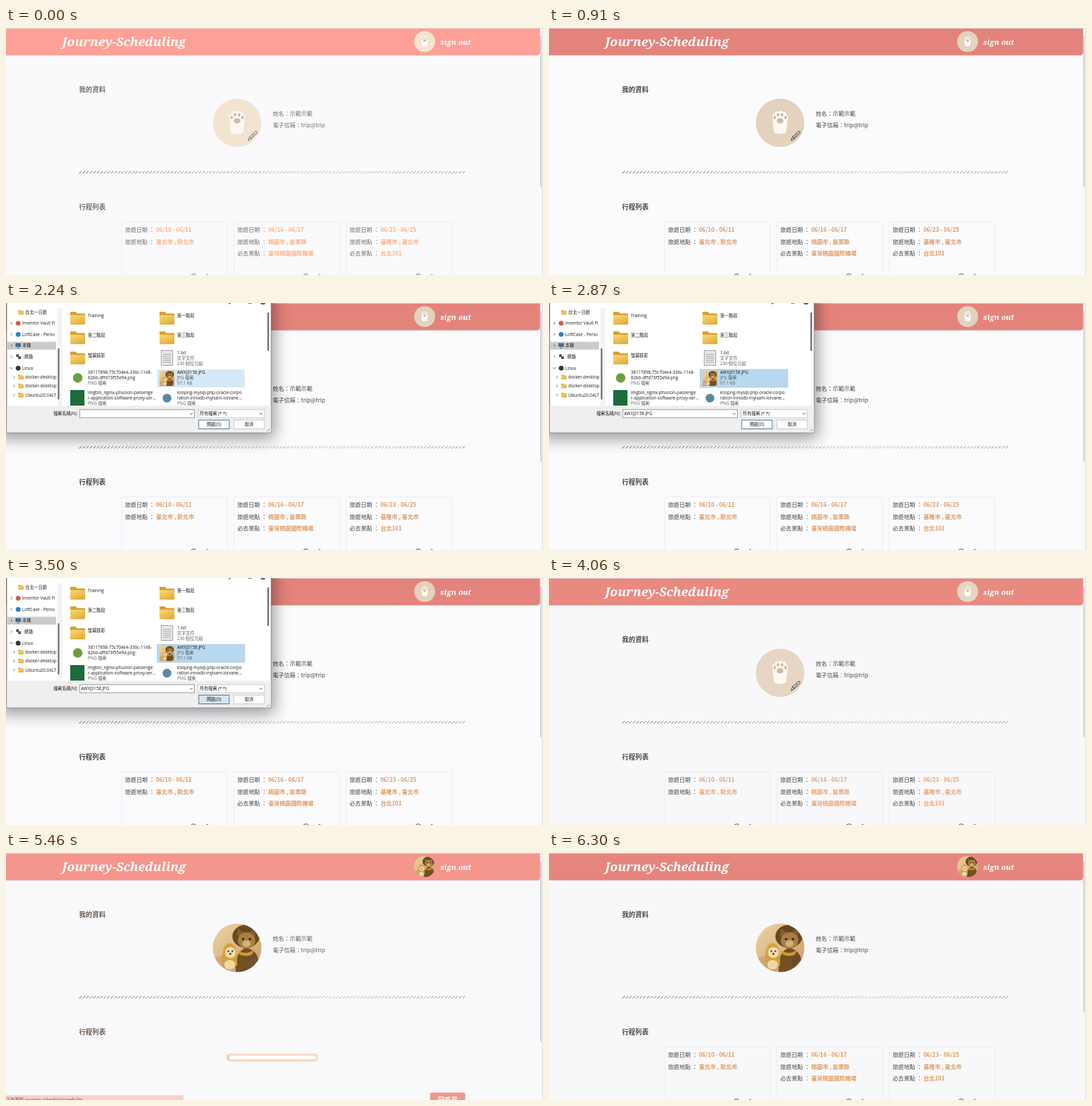
An HTML page that plays this animation: 794 px wide and 366 px high, repeating every 6.37 s.

```html
<!DOCTYPE html>
<html lang="zh-Hant">
<head>
<meta charset="utf-8">
<style>
html, body { margin: 0; width: 100%; height: 100%; overflow: hidden; background: #fafafd; }
svg { display: block; width: 794px; height: 366px; font-family: 'Noto Sans CJK TC', 'Noto Sans CJK JP', sans-serif; }
.page text { fill: var(--ink); font-size: 8.4px; font-weight: 500; white-space: pre; }
.page text.h { font-weight: 700; font-size: 9.8px; }
.page tspan { fill: var(--hot); font-weight: 700; }
.page text.title { font-family: 'Noto Serif', serif; font-style: italic; font-weight: 600; fill: #fff; }
.page text.button { fill: #fff; }
.win text { font: 6.4px 'Open Sans', 'Noto Sans CJK TC', 'Noto Sans CJK JP', sans-serif; fill: #1c1c1c; }
.win text.sub { fill: #606060; }
.line { fill: none; stroke: var(--ink); }
</style>
</head>
<body>
<svg id="stage" viewBox="0 0 794 366"></svg>
<script>
const LOOP = 6370, TICK = 70;
const OPEN = 1610, READY = 1750, HOVER = 2100, PICK = 2800, PRESS = 3290, CLOSE = 3780;
const WAIT = 4410, RELOAD = 5180, BAR = 5460, DONE = 5950;

// start, header, background, ink, accent, avatar
const themes = [
  [0, '#ffa096', '#fafafd', '#74706f', '#ffb07e', '#f3e4d2'],
  [70, '#e4837b', '#fbfbfe', '#444', '#de9860', '#e3d2bd'],
  [CLOSE, '#e98a80', '#f8f8fa', '#484848', '#eda06c', '#e6d6c3'],
  [RELOAD, '#f5968c', '#f9f9fb', '#6b5a52', '#eda06c', '#e6d6c3'],
  [DONE, '#e6857e', '#f8f8fa', '#4c4846', '#e09a58', '#e6d6c3']
];

const rect = (x, y, w, h, fill, more = '') =>
  `<rect x="${x}" y="${y}" width="${w}" height="${h}" fill="${fill}" ${more}/>`;
const dot = (x, y, r, fill, more = '') => `<circle cx="${x}" cy="${y}" r="${r}" fill="${fill}" ${more}/>`;
const oval = (x, y, rx, ry, fill) => `<ellipse cx="${x}" cy="${y}" rx="${rx}" ry="${ry}" fill="${fill}"/>`;
const text = (x, y, s, more = '') => `<text x="${x}" y="${y}" ${more}>${s}</text>`;
const path = (d, more) => `<path d="${d}" ${more}/>`;
const group = (id, body, more = '') => `<g id="${id}" ${more}>${body}</g>`;

// Both avatars are drawn in a 72 x 72 box.
const paw = dot(36, 36, 36, 'var(--face)') +
  path('M27 50Q25 36 25 29Q24 22 28 23Q29 17 33 20Q37 16 40 20Q45 18 45 24Q49 25 47 31L45 50Q36 55 27 50Z', 'fill="#fdf9f2"') +
  oval(36, 33, 5, 4, '#cdbba9') +
  [[28, 28], [33, 24], [39, 24], [44, 28]].map(p => oval(...p, 1.8, 2.5, '#cdb3a2')).join('');
const photo = rect(0, 0, 72, 72, 'url(#warm)') +
  path('M0 52Q30 38 72 50V72H0Z', 'fill="#d5a483"') +
  path('M34 72Q32 44 48 36Q68 38 68 62L60 72Z', 'fill="#72501f"') +
  oval(49, 19, 20, 17, '#694820') +
  path('M36 18L37 8L45 13H54L62 8L63 19Z', 'fill="#80602f"') +
  oval(50, 25, 13, 12, '#a87e42') + oval(50, 30, 6, 5, '#d2b078') +
  dot(45, 23, 1.8, '#34240f') + dot(55, 23, 1.8, '#34240f') +
  path('M36 40Q50 48 62 38L58 46Q49 50 40 46Z', 'fill="#d19a32"') +
  path('M14 62Q12 30 25 29Q37 30 36 62Q26 72 14 62Z', 'fill="#d3a23a"') +
  oval(26, 43, 8, 8, '#f0dcae') + dot(23, 41, 1.2, '#43301a') +
  dot(29, 41, 1.2, '#43301a') + dot(26, 45, 1.4, '#43301a') +
  oval(25, 61, 8, 7, '#eed7a5');

const defs = `<defs>
<linearGradient id="warm" x2="1" y2="1"><stop stop-color="#ecd6a2"/><stop offset="1" stop-color="#c99a66"/></linearGradient>
<linearGradient id="gold" x2=".6" y2="1"><stop stop-color="#fbd978"/><stop offset="1" stop-color="#e2ae3c"/></linearGradient>
<linearGradient id="hatch" gradientUnits="userSpaceOnUse" x1="108" x2="680" y1="0" y2="0">
<stop stop-color="#6a6462"/><stop offset=".45" stop-color="#a8968a"/><stop offset=".65" stop-color="#cbac94"/><stop offset="1" stop-color="#8a827e"/></linearGradient>
<filter id="soft" x="-20%" y="-20%" width="140%" height="150%"><feGaussianBlur stdDeviation="12"/></filter>
<clipPath id="round"><circle cx="36" cy="36" r="36"/></clipPath>
<clipPath id="tree"><rect x="0" y="0" width="75.5" height="152"/></clipPath>
<g id="paw">${paw}</g><g id="photo">${photo}</g></defs>`;

const avatar = name => ['translate(305.7 104.5)', 'translate(603.3 4.4) scale(.436)']
  .map(t => `<g transform="${t}"><use href="#${name}" clip-path="url(#round)"/></g>`).join('');

let slashes = '';
for (let x = 108; x < 677; x += 5.2) slashes += `M${x.toFixed(1)} 215.5l4 -3.4`;

const trips = [
  ['06/10 - 06/11', '臺北市 , 新北市'],
  ['06/16 - 06/17', '桃園市 , 苗栗縣', '臺灣桃園國際機場'],
  ['06/23 - 06/25', '基隆市 , 臺北市', '台北101']
];
const labels = ['旅遊日期', '旅遊地點', '必去景點'];
const card = (rows, i) => {
  const x = 171 + 166 * i;
  return rect(x, 287.5, 156, 90, 'none', 'rx="2" stroke="#ececef"') +
    rows.map((v, k) => text(x + 5, 302.3 + 17.3 * k, `${labels[k]} ： <tspan>${v}</tspan>`)).join('') +
    dot(x + 106.5, 369.5, 5, 'none', 'class="line"') +
    path(`M${x + 123} 368l3.5 -3l3.5 3`, 'class="line"');
};

const page = rect(0, 0, 794, 366, 'var(--bg)') +
  path('M0 1H790V36Q790 41 785 41H0Z', 'fill="#8a5550" opacity=".25"') +
  path('M0 .7H789.500V35.500Q789.500 40.300 785 40.300H0Z', 'fill="var(--head)"') +
  rect(0, 0, 794, .7, '#d5cbcb') +
  text(83, 27, 'Journey-Scheduling', 'class="title" style="font-size:18.4px"') +
  text(642, 25, 'sign out', 'class="title" style="font-size:11.2px"') +
  group('old', avatar('paw')) + group('new', avatar('photo')) +
  path('M358 167l2 -6l9 -8q3 0 2 3l-8 8zM360 161l3 3M362 163l6 -7', 'class="line" stroke-width="1"') +
  text(108, 95.3, '我的資料', 'class="h"') + text(108, 268.8, '行程列表', 'class="h"') +
  text(394.4, 130, '姓名：示範示範') + text(394.4, 147, '電子信箱：trip@trip') +
  path(slashes, 'stroke="url(#hatch)" stroke-width="1" fill="none"') +
  group('cards', trips.map(card).join('')) +
  group('loading',
    rect(327, 298.8, 133, 8.6, '#fff', 'rx="4.3" stroke="#fbd9c2" stroke-width="3.6"') +
    rect(329, 300.4, 1, 5.4, '#d99a78', 'id="fill"') +
    rect(627, 355, 52, 20, 'var(--head)', 'rx="3"') +
    text(653, 369.5, '回首頁', 'class="h button" text-anchor="middle"')) +
  group('status', path('M0 359H260Q262.500 359 262.500 361.500V366H0Z', 'fill="#f8d2c4"') +
    text(0, 367.8, '正在等候 journey-scheduling.website...', 'style="font-size:6.6px"')) +
  rect(790, 1, 4, 365, '#f8f8fa') + rect(793, 1, 1, 365, '#dadadd') +
  rect(790, 12, 2, 224, '#cfcfd3', 'id="thumb" rx="1"');

const folder = (x, y, k = 1) => `<g transform="translate(${x} ${y}) scale(${k})">` +
  path('M0 1Q0 0 1 0H8L10 2.500H21Q22 2.500 22 4V18H0Z', 'fill="#d9a030"') +
  path('M0 5H22V17.500Q22 19 21 19H1Q0 19 0 17.500Z', 'fill="url(#gold)"') + '</g>';
const sheet = (x, y, w, h, fill = '#fff') => rect(x, y, w, h, fill, 'stroke="#8a8a8a" stroke-width=".8"');
const chevron = (x, y) => path(`M${x - 1} ${y - 2}l2 2l-2 2`, 'fill="none" stroke="#555" stroke-width=".8"');

// text x, centre y, label
const tree = [
  [28.5, 14, '台北一日遊'], [24, 30, 'Inventor Vault Fi'], [24, 46.5, 'LoftCase - Perso'],
  [24, 63, '本機'], [27, 79.5, '網路'], [24, 96.5, 'Linux'],
  [28.5, 110, 'docker-desktop'], [28.5, 123, 'docker-desktop'], [28.5, 136.5, 'Ubuntu20.04LT']
];
const treeText = tree.map(([x, y, s], i) => text(x, y + 2.3, s) +
  (i == 5 ? path('M6 95.5l2 2l2 -2', 'fill="none" stroke="#333" stroke-width=".8"') :
    i ? chevron(i > 5 ? 12 : 8, y) : '')).join('');
const treeIcons = dot(18, 30, 3.6, '#d8584c') + dot(18, 46.5, 3.6, '#2b7fca') + dot(18, 96.5, 3.6, '#333') +
  rect(14, 59.5, 8, 5.5, '#3d6f92') + rect(16.5, 66, 3, 1, '#555') +
  [10.5, 106.5, 119.5].map(y => folder(18, y, .36)).join('');

const lines = (x, y, main, ...subs) => [...main, ...subs].map((s, i) =>
  text(x, y + 8.1 * i, s, i < main.length ? '' : 'class="sub"')).join('');
const files = [[95, 13, 'Training'], [227, 13, '第一階段'], [95, 42, '第二階段'], [227, 42, '第三階段'], [95, 72, '螢幕錄影']]
  .map(([x, y, s]) => folder(x, y) + text(x + 26, y + 7.5, s)).join('') +
  sheet(229.5, 70.5, 17, 22, '#e9e9e9') +
  path('M232 76h12m-12 3h12m-12 3h12m-12 3h12m-12 3h12', 'stroke="#a2a2a2" stroke-width="1"') +
  lines(253, 75.8, ['1.txt'], '文字文件', '236 個位元組') +
  dot(106, 111, 7, '#6a9f3f') +
  lines(121, 105.2, ['38117898-75c704e4-336c-11e8-', '82bb-dffd73f55e94.png'], 'PNG 檔案') +
  rect(223.5, 98.5, 129.5, 26.5, '#d5e8f6', 'id="row" stroke-width=".8"') +
  '<svg x="227" y="100" width="22" height="23" viewBox="0 0 72 72" preserveAspectRatio="none"><use href="#photo"/></svg>' +
  lines(253, 105.2, ['AWXJ3158.JPG'], 'JPG 檔案', '97.1 KB') +
  rect(95, 129, 21, 23, '#1d6b3a') +
  lines(121, 134.8, ['imgbin_nginx-phusion-passenge', 'r-application-software-proxy-ser...'], 'PNG 檔案') +
  dot(238, 141, 6.5, '#5d87a1') +
  lines(253, 134.8, ['kisspng-mysql-php-oracle-corpo', 'ration-innodb-myisam-lorvane...'], 'PNG 檔案');

const field = (x, y, w, h, more = '') => rect(x, y, w, h, '#fff', `class="field" ${more}`);
const drop = (x, y) => path(`M${x - 2} ${y}l2 2l2 -2`, 'fill="none" stroke="#444" stroke-width=".8"');
const win =
  rect(-12, -20, 408, 220, '#000', 'opacity=".42" filter="url(#soft)"') +
  rect(1, -30, 391, 222, '#fff', 'stroke="#777" stroke-width=".8"') +
  rect(1.4, 152.5, 390.2, 39.2, '#efefef') +
  rect(76, 8, 7, 144, '#f3f3f3') +
  rect(2, 57.5, 72, 11.5, '#cbcbcb') +
  `<g clip-path="url(#tree)">${treeText}</g>` +
  folder(18, 133, .36) +
  path('M15 76h4v3h3v4h-4v-3h-3z', 'fill="#4a5a66"') +
  rect(76.6, 67, 2.4, 76, '#777', 'rx="1"') + rect(386.4, 14, 2.6, 57, '#777', 'rx="1"') +
  field(109, 158, 169.500, 12) + field(284, 158, 98, 12) +
  field(285, 173.500, 45, 13, 'id="ok"') + field(337, 173.500, 45, 13) +
  group('bare', rect(71, 159, 36, 8, '#fff') + sheet(18, 10, 5.5, 7.5)) +
  group('full', `<g clip-path="url(#tree)">${treeIcons}</g>` + files + rect(1.4, 152.5, 390.2, 2, '#efefef') +
    text(106, 166.4, '檔案名稱(N):', 'text-anchor="end"') + text(111, 166.4, 'AWXJ3158.JPG', 'id="name"') +
    text(286.500, 166.4, '所有檔案 (*.*)') + drop(274, 163) + drop(377, 163) +
    text(307.500, 182.3, '開啟(O)', 'text-anchor="middle"') + text(359.500, 182.3, '取消', 'text-anchor="middle"') +
    dot(380, -1.5, 4, '#3c6f9c') + rect(329, 0, 3, 1.5, '#777') + rect(358, 0, 5, 1, '#777') +
    path('M386 190l4 -4m-2 4l2 -2', 'stroke="#999" stroke-width=".8"'));

const stage = document.getElementById('stage');
stage.innerHTML = defs + group('page', page, 'class="page"') + group('win', win, 'class="win"');
const el = id => document.getElementById(id);
const show = (id, on) => { el(id).style.display = on ? '' : 'none'; };
const fields = [...document.querySelectorAll('.field')];

function draw(t) {
  const theme = themes.filter(r => r[0] <= t).pop();
  ['head', 'bg', 'ink', 'hot', 'face'].forEach((k, i) => stage.style.setProperty('--' + k, theme[i + 1]));

  const reloaded = t >= RELOAD, loading = reloaded && t < DONE;
  show('old', !reloaded);
  show('new', reloaded);
  show('cards', !loading);
  show('loading', loading);
  show('status', t >= WAIT && t < DONE - 140);
  el('thumb').setAttribute('height', loading ? 268 : 224);
  el('fill').setAttribute('width', 1 + 128 * Math.min(1, Math.max(0, (t - BAR) / (DONE - BAR))));

  const open = t >= OPEN && t < CLOSE + TICK;
  show('win', open);
  if (!open) return;
  const closing = t >= CLOSE, full = t >= READY;
  const scale = closing ? .96 : t < OPEN + TICK ? .94 : full ? 1 : .975;
  el('win').setAttribute('transform', `translate(164 60) scale(${scale}) translate(-164 -60)`);
  el('win').setAttribute('opacity', closing ? .4 : t < OPEN + TICK ? .6 : 1);
  show('bare', !full);
  show('full', full);
  fields.forEach((f, i) => {
    f.setAttribute('stroke', full ? ['#8c8c8c', '#c4c4c4', '#41688a', '#c4c4c4'][i] : 'none');
    f.setAttribute('stroke-width', .9);
  });
  show('row', t >= HOVER);
  el('row').setAttribute('fill', t >= PICK ? '#b8d8ef' : '#d5e8f6');
  el('row').setAttribute('stroke', t >= PICK ? '#a4cae4' : 'none');
  show('name', t >= PICK);
  el('ok').setAttribute('fill', t >= PRESS ? '#d6e5ef' : '#fff');
}

function loop() {
  draw(Math.floor(performance.now() % LOOP / TICK) * TICK);
  requestAnimationFrame(loop);
}
loop();
</script>
</body>
</html>
```
